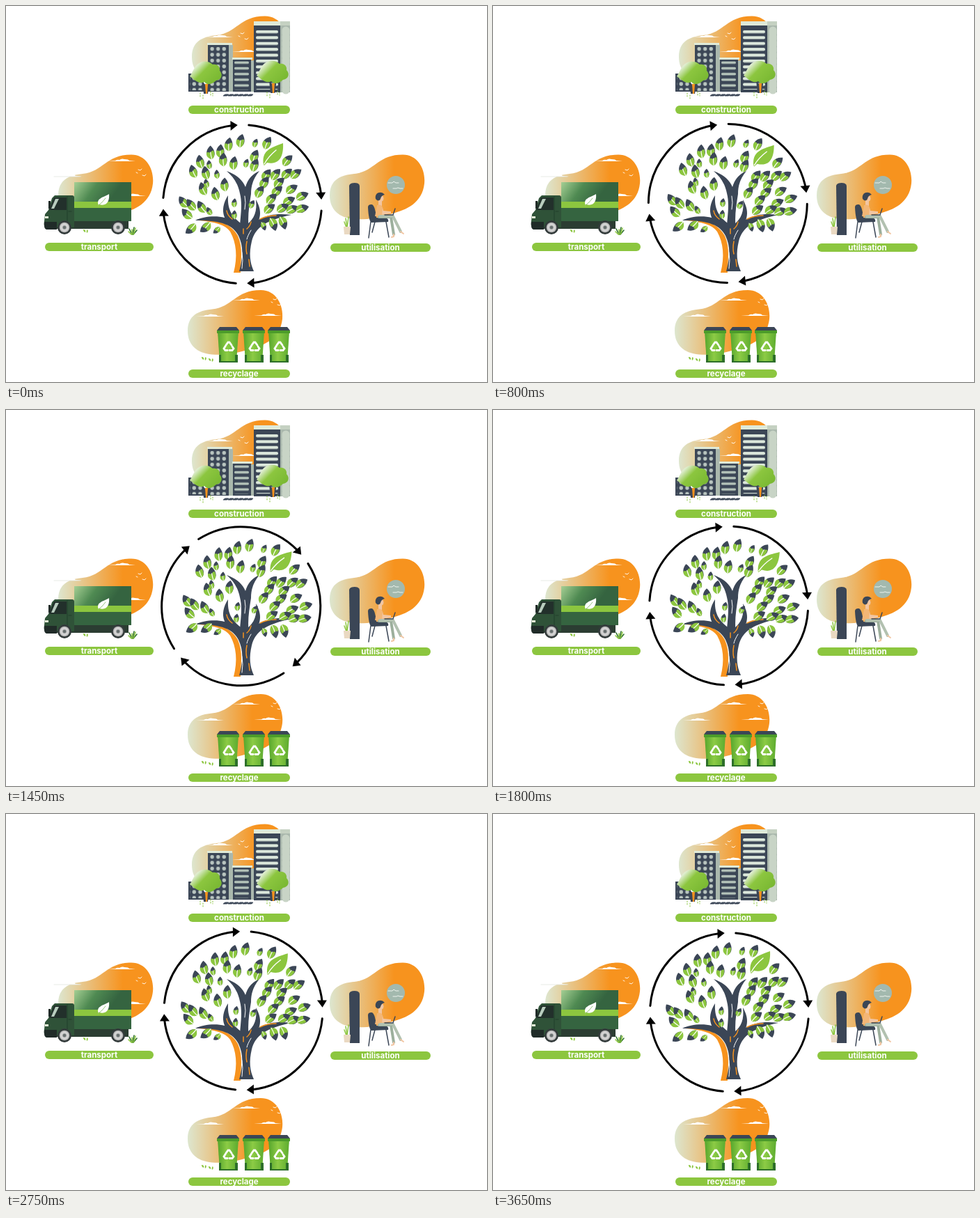
These frames come from a looping animation (691x540 px, 3700 ms). An HTML page:

```html
<!DOCTYPE html>
<html lang="fr">
<head>
<meta charset="utf-8">
<style>
  html, body { margin: 0; width: 100%; height: 100%; overflow: hidden; background: #fff; }
  svg { display: block; }
  .dark { fill: #3b4656; }
  .green { fill: #8cc63f; }
  .orange { fill: #f7931e; }
  .line { fill: none; stroke-linecap: round; }
  .label { font: 700 11.5px Inter, "Open Sans", sans-serif; fill: #fff; text-anchor: middle; }
</style>
</head>
<body>
<svg width="691" height="540" viewBox="0 0 691 540">
  <defs>
    <linearGradient id="sunset">
      <stop offset="0" stop-color="#dde6cf"/><stop offset=".68" stop-color="#f7931e"/>
    </linearGradient>
    <linearGradient id="foliage" x2="1" y2=".7">
      <stop offset="0" stop-color="#fff"/><stop offset=".25" stop-color="#dceccb"/>
      <stop offset=".5" stop-color="#8cc63f"/><stop offset="1" stop-color="#79b832"/>
    </linearGradient>
    <linearGradient id="van" x2="1" y2=".25">
      <stop offset="0" stop-color="#a5cf94"/><stop offset=".4" stop-color="#4f8a52"/>
      <stop offset=".8" stop-color="#356440"/>
    </linearGradient>
    <linearGradient id="binBody">
      <stop offset="0" stop-color="#55a52c"/><stop offset=".45" stop-color="#8ccb45"/>
      <stop offset="1" stop-color="#5cab2f"/>
    </linearGradient>
    <radialGradient id="hub">
      <stop offset="0" stop-color="#777"/><stop offset=".6" stop-color="#ddd"/><stop offset="1" stop-color="#aaa"/>
    </radialGradient>
    <pattern id="dots" x="292" y="58" width="8.6" height="8.4" patternUnits="userSpaceOnUse">
      <rect x="1.5" y="1" width="5.2" height="5.2" rx="2" fill="#b9c5c0"/>
    </pattern>
    <pattern id="bars" x="358" y="34" width="34" height="8.4" patternUnits="userSpaceOnUse">
      <rect x="1" y="1" width="32" height="4.2" rx="2" fill="#dce8dc"/>
    </pattern>
    <pattern id="slats" x="327" y="78" width="24" height="8.2" patternUnits="userSpaceOnUse">
      <rect x="1" y="1.500" width="21" height="3.600" rx="1.600" fill="#b5c4ba"/>
    </pattern>

    <path id="blob" fill="url(#sunset)" d="M465 272C465 250 480 243 500 241C530 238 533 213.500 570 213.500C592 213.500 603 235 601 255C598 283 575 293 555 298C530 306 515 307 500 306C478 304 465 292 465 272Z"/>
    <path id="cloud" fill="#fff" d="M0 0L11-.8Q13-3 17-2Q20-4.500 24-3L29-2.500 31-1 40 0Z"/>
    <path id="birds" class="line" stroke="#fff" stroke-width=".9" d="M0 0l3 1 2-2M6 8l3 1 2-2M-3 4l2 1"/>
    <g id="shrub">
      <path class="dark" d="M282 108L287 114 293 107 290 126H284Z"/>
      <path class="orange" d="M286 112L290 112 289 126H287Z"/>
      <path fill="url(#foliage)" d="M264 101C267 97 268 93 272 87C277 79 290 77 297 84C304 83 308 88 307 93C312 98 310 106 302 107C295 113 289 114 285 109C277 113 271 106 264 101Z"/>
      <path class="line" stroke="#8cc63f" stroke-dasharray="1.5 2" d="M279 125v6M283 128v5M294 123v7M297 125v4"/>
    </g>
    <g id="bin">
      <path fill="url(#binBody)" d="M304 467H334L331 512H307Z"/>
      <path fill="#4c9c2a" d="M303 466H335V470H303Z"/>
      <path class="dark" d="M307 461H331L335 466H303Z"/>
      <path fill="#2d6f2a" d="M306 501H309V512H306ZM329 501H333V512H329ZM307 510H332V512H307Z"/>
      <path class="line" stroke="#fff" stroke-width="2.800" stroke-linecap="butt" d="M316 487L319 483H321L324 487M325 489L327 492 325 494.500H321M318 494.500H315L313 492 315.500 488"/>
    </g>
    <g id="tuft" class="line" stroke-width="1.6">
      <path stroke="#2d6f2a" d="M0 0L-4-8M1 0L3-10M2 0L7-6"/><path stroke="#8cc63f" d="M0 0L0-7M2 0L5-9M-1 0L-5-4"/>
    </g>
    <path id="sprout" class="green" d="M0 0q-3-1-3-4q4 0 3 4ZM2 1q-1-4 1-5q2 3-1 5Z"/>
    <g id="wheel">
      <circle r="10" fill="#333b3b"/><circle r="7.300" fill="url(#hub)"/><circle r="2.300" fill="#687070"/>
    </g>
    <g id="leaf">
      <path class="dark" d="M-1 9C-9 4-7-6 3-10C7-3 7 6-1 9Z"/>
      <path class="green" d="M-1 9.500C-8 5-7 0-5-2.500Q-2-2-.5 0Q2-3 5-2C5 4 4 7-1 9.500Z"/>
      <path class="line" stroke="#fff" stroke-width="1.200" d="M-1 9Q-1 4 0-1"/>
    </g>
    <g id="arrow">
      <path class="line" stroke="#000" stroke-width="3" stroke-linecap="butt" d="M113.600 9.300A114 114 0 0 1 13.900 113.200"/>
      <path d="M113.800 0L106.500-10.500 120.500-10Z" transform="rotate(86.600)"/>
    </g>
  </defs>

  <!-- construction -->
  <use href="#blob" x="-198" y="-199"/>
  <use href="#cloud" x="286" y="45"/><use href="#cloud" x="324" y="66"/><use href="#birds" x="337" y="39"/>
  <path class="dark" d="M262 97H284V123H262ZM290 55H320V123H290ZM325 76H352V123H325ZM356 27H395V124H356Z"/>
  <path fill="#aab8ad" d="M320 56H326V123H320ZM352 78H356V123H352ZM394 27H408V124H394Z"/>
  <path fill="#dfead9" d="M289 53H325V56H289ZM325 74H354V77H325ZM356 22H394V28H356Z"/>
  <path fill="#c5d1c2" d="M394 22H408V28H394Z"/>
  <path class="line" stroke="#c8d4c6" stroke-width="11" stroke-linecap="butt" stroke-dasharray="4.400 4" d="M402 35V121"/>
  <path fill="url(#dots)" d="M292 58H318V122H292ZM264 100H282V121H264Z"/>
  <path fill="url(#bars)" d="M358 34H392V120H358Z"/>
  <path fill="url(#slats)" d="M327 78H351V121H327Z"/>
  <use href="#shrub"/><use href="#shrub" x="96" y="-1"/>
  <path class="line" stroke="#3b4656" stroke-width="3" stroke-linecap="butt" stroke-dasharray="4 3" d="M314 128H356" transform="translate(128) skewX(-45)"/>

  <!-- transport -->
  <use href="#blob" x="-390"/>
  <use href="#cloud" x="146" y="223"/><use href="#cloud" x="161" y="273"/><use href="#cloud" x="69" y="245"/>
  <use href="#birds" x="190" y="235"/>
  <path class="line" stroke="#e3e6df" stroke-width=".8" d="M69 245H107"/>
  <path fill="#2b3d32" d="M72 306H176V320H72Z"/>
  <path fill="url(#van)" d="M98 253H180V282H98Z"/>
  <path class="green" d="M98 281H180V291H98Z"/>
  <path fill="#356440" d="M98 290H180V309H98Z"/>
  <path fill="#2f5238" d="M70 272H95Q98 272 98 275V318H56Q54 315 55 309L56 299 61 293 66 276Z"/>
  <path fill="#22302b" d="M69 275H87V293H62Z"/>
  <path fill="#b9cdbf" d="M71 277H76L69 291H65Z"/>
  <path fill="#202b28" d="M55 310H73V321H58Q54 320 55 310ZM61 280H64V291H61Z"/>
  <path fill="#e8f1d8" d="M56 302H61V305H56Z"/>
  <path class="line" stroke="#203f2a" d="M88 274V311M90 295H94"/>
  <path fill="#fff" d="M133 286C129 276 140 275 148 270C149 280 145 288 134 285L132 288Z"/>
  <path class="line" stroke="#78b45b" stroke-width=".8" d="M133 286Q138 283 143 276"/>
  <use href="#wheel" x="84" y="318"/><use href="#wheel" x="161" y="318"/>
  <use href="#sprout" x="114" y="325"/><use href="#tuft" x="181" y="328"/>

  <!-- utilisation -->
  <use href="#blob"/>
  <circle cx="560" cy="257" r="13" fill="#a3b9ae"/>
  <path class="line" stroke="#eef3ed" d="M549 254h6l2-2 3 2h4M556 262h5l2-1 3 1h4"/>
  <path class="dark" d="M493 258Q494 254 501 254Q508 254 508 259V329H494Z"/>
  <path class="line" stroke="#8cc63f" stroke-width="1.500" d="M490 318L488 305M490 318L492 303M489 318L486 310"/>
  <path fill="#ead9c2" d="M485 317H495L494 328H486Z"/>
  <path class="dark" d="M520 289Q520 285 525 285Q530 285 532 304L547 305Q550 306 549 310L525 311Q521 309 520 289Z"/>
  <path class="line" stroke="#3b4656" stroke-width="1.500" d="M524 310L521 333M546 310L550 332M530 310L526 325"/>
  <path fill="#f2c6a3" d="M535 279H540V287H535ZM533 286Q541 285 542 294L553 295 553 298 540 300Z"/>
  <path fill="#f3b676" d="M533 286Q540 284 541 290L540 302H530Z"/>
  <path fill="#f2c6a3" d="M537 271Q544 272 542 279L538 282Z"/>
  <path class="dark" d="M531 277C529 267 540 265 544 271Q539 272 538 277Q535 282 531 277Z"/>
  <path class="line" stroke="#9caf9c" stroke-width="4" d="M536 303L553 303 557 328"/>
  <path class="line" stroke="#b2c1b0" stroke-width="4" d="M537 302L556 302 567 324"/>
  <path class="line" stroke="#f2c6a3" stroke-width="2" d="M557 328V331L554 332M567 324L571 327"/>
  <path class="line" stroke="#3b4656" stroke-width="1.400" d="M544 300H556L559 291"/>

  <!-- recyclage -->
  <use href="#blob" x="-204" y="194.500"/>
  <use href="#cloud" x="325" y="423"/><use href="#cloud" x="356" y="445"/><use href="#cloud" x="273" y="446"/>
  <use href="#birds" x="384" y="421"/>
  <use href="#bin"/><use href="#bin" x="37"/><use href="#bin" x="73"/>
  <use href="#sprout" x="284" y="508"/><use href="#sprout" x="294" y="510"/>

  <g id="labels"></g>

  <!-- tree -->
  <path class="orange" d="M276 308C305 306 323 312 333 330C341 348 337 365 337 383H327C333 360 331 340 322 324C315 314 300 310 276 308Z"/>
  <g class="dark">
    <path d="M335 381C341 360 341 345 334 330C326 315 312 308 272 308C283 302 302 301 314 304C328 307 337 315 345 325C359 303 380 296 410 300C376 307 358 317 353 338C349 355 350 368 356 381Z"/>
    <path d="M335 326C337 300 340 285 336 269C333 254 326 245 317 237C331 242 340 250 344 260C347 249 354 241 364 237C355 248 352 258 352 270C349 290 346 305 350 328Z"/>
    <path d="M319 272C318 291 323 302 340 314L339 326C312 313 305 294 319 272Z"/>
    <path d="M359 278C361 295 357 305 346 314L347 328C366 312 370 297 359 278Z"/>
  </g>
  <path class="line" stroke="#f7931e" stroke-width="1.500" d="M317 294Q318 301 325 306M352 310Q351 316 346 320M365 306Q375 301 388 301M346 338Q344 348 346 356M349 364L350 374M341 320L341 327"/>
  <path class="line" stroke="#fff" d="M343 273Q345 282 343 292M339 354Q341 365 339 377M352 322Q347 330 346 335"/>

  <g id="crown">
    <path class="green" d="M370 228C367 208 379 204 398 197C399 214 394 229 375 225L371 229Z"/>
    <path class="line" stroke="#fff" stroke-width="1.400" d="M371 227Q377 216 388 207"/>
  </g>
  <g id="cycle"></g>
</svg>
<script>
  const LOOP = 3700, FRAME = 50;
  const QUARTERS = [0, 930, 1865, 2690, 3590];
  const $ = id => document.getElementById(id);

  const labels = [
    ["construction", 262, 143, 146], ["transport", 56, 340, 156],
    ["utilisation", 466, 341, 144], ["recyclage", 262, 522, 146]
  ];
  $("labels").innerHTML = labels.map(([text, x, y, w]) =>
    `<rect class="green" x="${x}" y="${y}" width="${w}" height="12" rx="6"/>
     <text class="label" x="${x + w / 2}" y="${y + 10}">${text}</text>`).join("");

  // Leaf centres; leaves fan out upwards, the lowest ones hang down.
  const leaves = [
    337,194, 320,199, 358,197, 375,197, 308,209, 294,211, 312,221, 327,226, 357,216, 345,226, 357,229,
    279,224, 292,228, 269,238, 287,240, 404,222, 374,243, 387,242, 403,241, 416,241, 371,254, 392,254,
    389,266, 410,263, 425,273, 406,280, 381,277, 364,267, 378,291, 397,290, 411,292, 425,291,
    255,282, 266,286, 283,263, 301,270, 314,257, 288,255, 260,299, 281,289, 292,295,
    266,320, 287,318, 303,322, 328,283, 328,300, 353,285, 370,316, 384,313, 398,311, 303,242
  ];
  const small = new Set([345, 358, 288, 303, 328, 353, 292, 370]);
  const degrees = Math.PI / 180;
  for (let i = 0; i < leaves.length; i += 2) {
    const x = leaves[i], y = leaves[i + 1];
    const angle = y > 305 ? 145 * Math.sign(x - 338) : Math.atan2(x - 338, 345 - y) / degrees;
    const size = small.has(x) ? .66 : 1;
    $("crown").innerHTML += `<use href="#leaf" transform="translate(${x} ${y}) rotate(${angle}) scale(${size})"/>`;
  }
  $("cycle").innerHTML = [0, 90, 180, 270].map(a =>
    `<use href="#arrow" transform="translate(339.5 284.7) rotate(${a})"/>`).join("");

  const wave = p => (1 - Math.cos(Math.PI * p)) / 2;

  // The ring eases through one quarter turn per step.
  function ringAngle(t) {
    const next = QUARTERS.findIndex(time => time > t);
    if (next < 0) return 360;
    const from = QUARTERS[next - 1];
    return 90 * (next - 1 + wave((t - from) / (QUARTERS[next] - from)));
  }

  function draw(now) {
    const t = Math.floor(now % LOOP / FRAME) * FRAME;
    $("cycle").setAttribute("transform", `rotate(${ringAngle(t)} 339.1 282.9)`);
    $("crown").setAttribute("transform", `rotate(${6 * wave(2 * t / (LOOP - FRAME))} 337 332)`);
    requestAnimationFrame(draw);
  }
  draw(performance.now());
</script>
</body>
</html>
```
